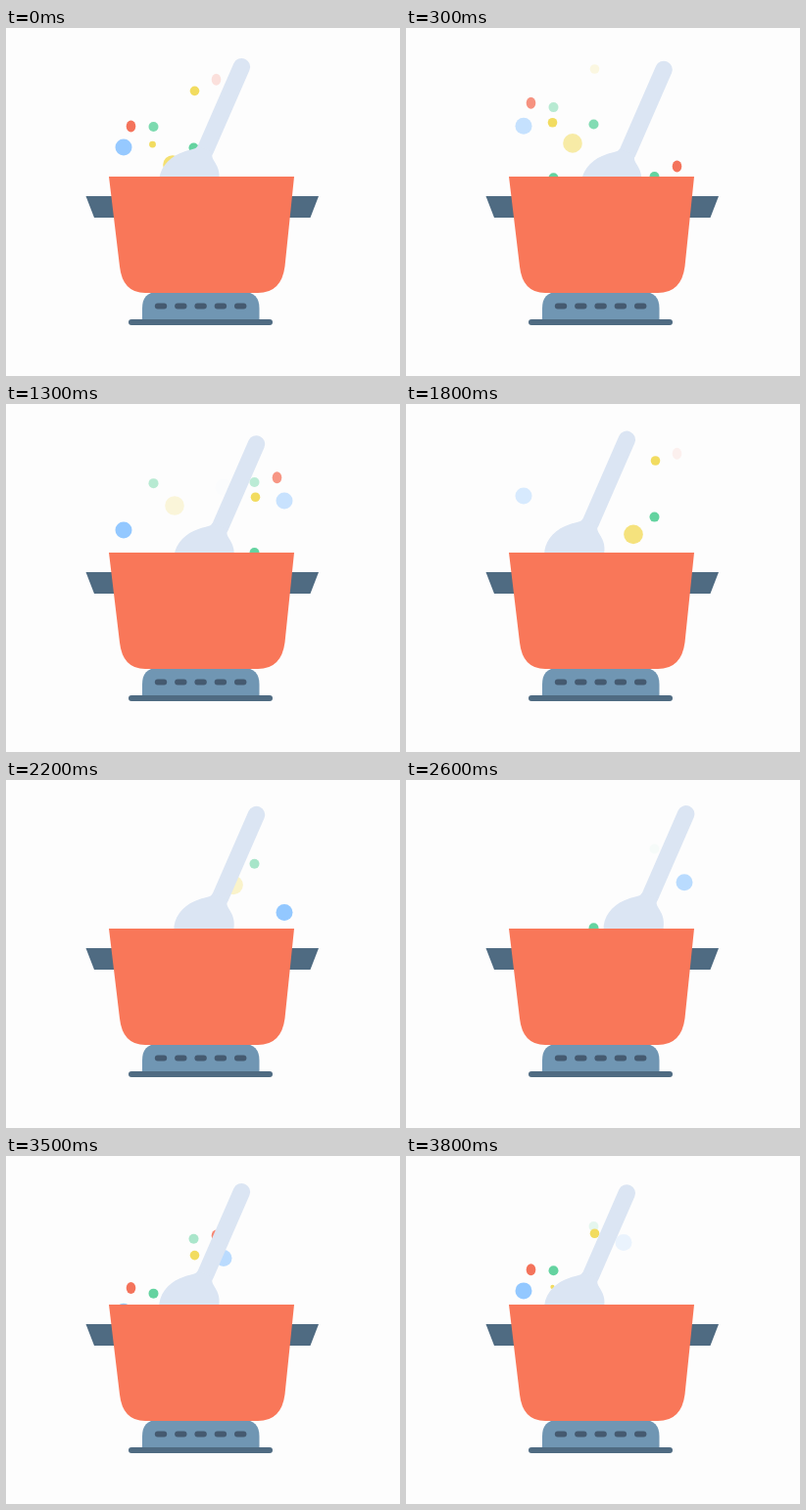
These frames come from a looping animation (402 px wide and 356 px high, 3900 ms). An HTML page with a canvas:

```html
<!DOCTYPE html>
<html lang="en">
<head>
<meta charset="utf-8">
<title>Cooking pot</title>
<style>
  html, body { margin: 0; height: 100%; overflow: hidden; background: #fdfdfd; }
  canvas { display: block; }
</style>
</head>
<body>
<canvas id="stage" width="402" height="356"></canvas>
<script>
const ctx = document.getElementById('stage').getContext('2d');
const LOOP = 3900, CYCLE = 4000, STEP = 100, RISE = 1800, RIM = 152;

// The spoon handle's tip travels in straight lines between these points.
const spoonKeys = [
  { t: -250, x: 221.5, y: 37.5 },
  { t: 750, x: 297, y: 46.5 },
  { t: 1750, x: 221.5, y: 36.5 },
  { t: 2750, x: 297, y: 34.5 },
  { t: 3750, x: 221.5, y: 37.5 },
  { t: 4750, x: 297, y: 46.5 }
];

// Each burst throws the same bits, mirrored by dir.
const bursts = [
  { start: 0, x: 284, dir: -1 },
  { start: 3020, x: 120, dir: 1 },
  { start: 2285, x: 222, dir: -1 }
];
const bits = [
  { dx: 0, delays: [-15, 1375], top: 83.5, travel: 92, rx: 8.5, ry: 8.5, gone: 1650, color: '#93c8ff' },
  { dx: 7.5, delays: [130], top: 49.5, travel: 94, rx: 4.8, ry: 6, gone: 1740, color: '#f4735b' },
  { dx: 30.5, delays: [-118, 883], top: 70, travel: 94, rx: 5, ry: 5, gone: 1750, color: '#64d3a0' },
  { dx: 52, delays: [765], top: 98.5, travel: 91, rx: 9.8, ry: 9.8, gone: 1700, color: '#f4e072' }
];

const pot = new Path2D('M105 152H294L284.5 244Q281 271 257 271H142Q119 271 116 244Z');
const handles = new Path2D('M81.5 172H112V194H90ZM319 172H288V194H310.5Z');
const burner = new Path2D('M139 299V287Q139 270 155 270H242Q258.500 270 258.500 287V299Z');
const bowl = new Path2D('M-45 81C-47 85-52 84-58 86.500C-72 91-82 101-84 114L-84 125H-23V116' +
  'C-22 108-24 103-27 98C-30 93-31 91-29 87Z');

const clamp = (v, lo, hi) => Math.min(hi, Math.max(lo, v));

function fill(path, color) {
  ctx.fillStyle = color;
  ctx.fill(path);
}

function stroke(x1, y1, x2, y2, width, color) {
  ctx.lineCap = 'round';
  ctx.lineWidth = width;
  ctx.strokeStyle = color;
  ctx.beginPath();
  ctx.moveTo(x1, y1);
  ctx.lineTo(x2, y2);
  ctx.stroke();
}

function oval(x, y, rx, ry, color, alpha) {
  ctx.globalAlpha = alpha;
  ctx.fillStyle = color;
  ctx.beginPath();
  ctx.ellipse(x, y, rx, ry, 0, 0, 2 * Math.PI);
  ctx.fill();
  ctx.globalAlpha = 1;
}

const ageAt = (t, start) => ((t - start) % CYCLE + CYCLE) % CYCLE;

function drawBits(t) {
  ctx.save();
  ctx.beginPath();
  ctx.rect(0, 0, 402, RIM + 1);
  ctx.clip();
  for (const { start, x, dir } of bursts) {
    for (const bit of bits) {
      for (const delay of bit.delays) {
        const age = ageAt(t, start + delay);
        if (age > RISE) continue;
        const y = bit.top + bit.travel * (1 + Math.cos(Math.PI * age / RISE)) / 2;
        const alpha = clamp((bit.gone - age) / (bit.gone - 980), 0, 1);
        oval(x + dir * bit.dx, y, bit.rx, bit.ry, bit.color, alpha);
      }
    }
    // A small bit that grows while it rises at constant speed.
    const age = ageAt(t, start);
    const r = clamp((age - 450) * 0.0065, 0, 4.8);
    const alpha = clamp((2050 - age) / 200, 0, 1);
    oval(x + dir * 29.5, 132.5 - 0.0745 * (age - 800), r, r, '#f2dc60', alpha);
  }
  ctx.restore();
}

function drawSpoon(t) {
  const next = spoonKeys.findIndex(key => key.t > t);
  const a = spoonKeys[next - 1], b = spoonKeys[next];
  const p = (t - a.t) / (b.t - a.t);
  ctx.save();
  ctx.translate(a.x + (b.x - a.x) * p, a.y + (b.y - a.y) * p);
  stroke(0, 0, -37, 85, 17.5, '#dbe5f3');
  fill(bowl, '#dbe5f3');
  ctx.restore();
}

function draw(t) {
  ctx.fillStyle = '#fdfdfd';
  ctx.fillRect(0, 0, 402, 356);
  fill(handles, '#4f6b82');
  fill(burner, '#7096b3');
  for (let i = 0; i < 5; i++) {
    const x = 158 + i * 20.3;
    stroke(x - 3.2, 284.5, x + 3.2, 284.5, 6, '#455a70');
  }
  stroke(128, 301, 269, 301, 6, '#4f6b82');
  drawBits(t);
  drawSpoon(t);
  fill(pot, '#f97759');
}

function tick() {
  const t = performance.now() % LOOP;
  draw(Math.floor(t / STEP) * STEP);
  requestAnimationFrame(tick);
}
tick();
</script>
</body>
</html>
```
